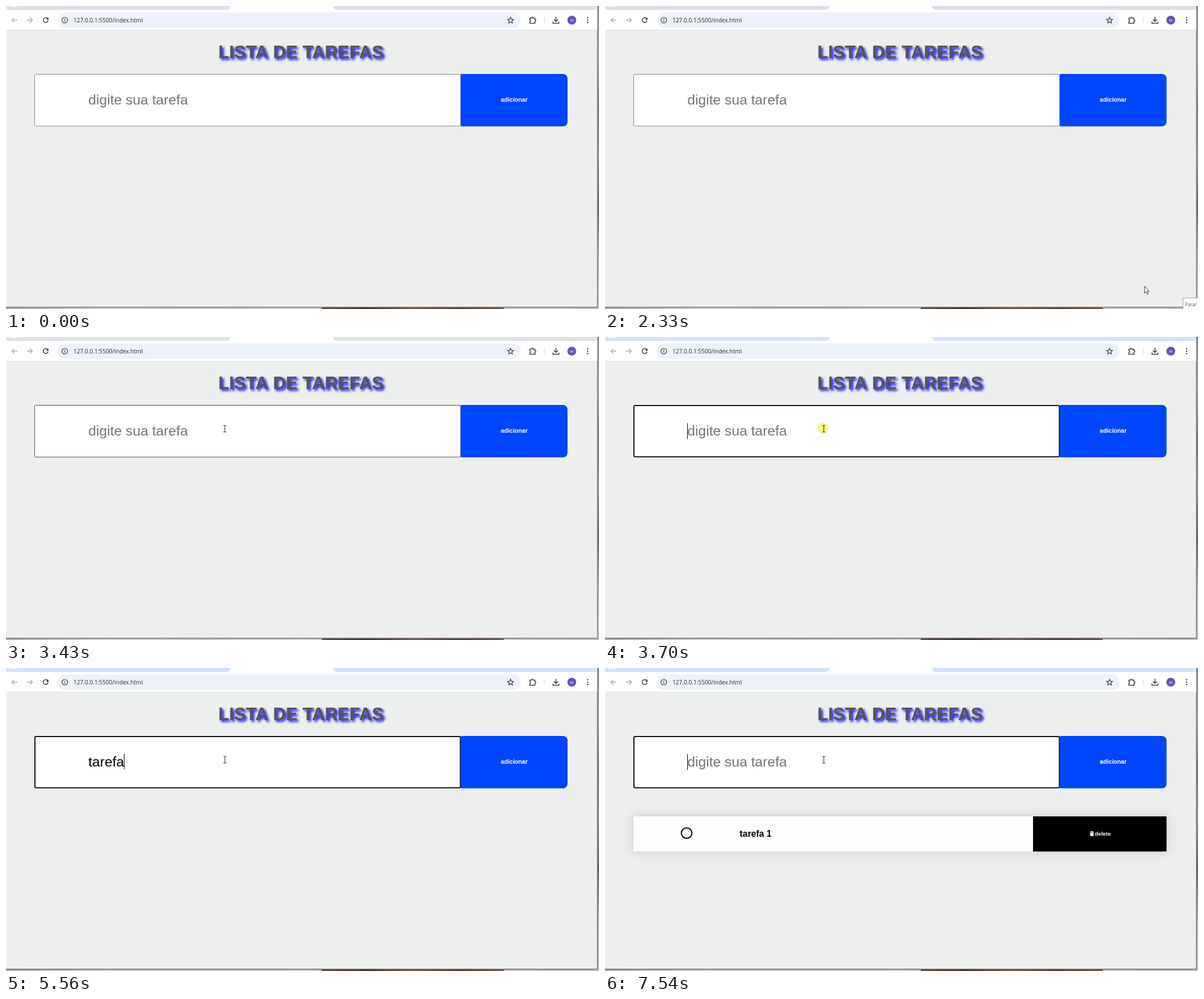
Animation of 1046 by 535 pixels, one loop 8000 ms. Source, as an HTML page with a canvas:

```html
<!DOCTYPE html>
<html lang="pt">
<head>
<meta charset="utf-8">
<title>Lista de tarefas</title>
<style>
  html, body { margin: 0; width: 100%; height: 100%; overflow: hidden; background: #edefee; }
  canvas { display: block; }
</style>
</head>
<body>
<canvas id="stage" width="1046" height="535"></canvas>
<script>
const ctx = document.getElementById('stage').getContext('2d');
const LOOP = 8000;
const ARIAL = '"Liberation Sans", Arial, sans-serif';
const UI = '"Open Sans", "Noto Sans", sans-serif';
const INK = '#3c4043';

// Each row: start time, then the values that hold from there on.
const POINTER = [
  [2330, 951, 494], [2400, 918, 482], [2470, 872, 465], [2540, 824, 447], [2610, 788, 434],
  [2880, 590, 350], [2950, 384, 260], [3230, 385, 228], [3300, 386, 190], [3370, 386, 170],
  [3430, 386, 162]
];
const TYPING = [
  [3630, '', 145], [4560, 't', 151], [4830, 'ta', 165], [5030, 'tar', 174], [5230, 'tare', 188],
  [5430, 'taref', 195], [5560, 'tarefa', 208], [6020, 'tarefa ', 215], [6480, 'tarefa 1', 229],
  [7140, '', 145]
];
const CARET = [[3630, true], [4160, false], [4560, true], [7010, false], [7540, true]];
const TOOLTIP = [[1200, 0.5], [1270, 1], [2400, 0.5], [2470, 0]];
const STRIP = [[0, '#dde1e6'], [3630, '#d8e2f1'], [3700, '#d3e3fd']];

const at = (rows, t) => rows.filter(row => row[0] <= t).pop();

function box(x, y, w, h, fill, radius = 0) {
  ctx.fillStyle = fill;
  ctx.beginPath();
  ctx.roundRect(x, y, w, h, radius);
  ctx.fill();
}

function frame(x, y, w, h, color, width, radius) {
  ctx.strokeStyle = color;
  ctx.lineWidth = width;
  ctx.beginPath();
  ctx.roundRect(x + width / 2, y + width / 2, w - width, h - width, radius);
  ctx.stroke();
}

function disc(x, y, r, fill) {
  ctx.fillStyle = fill;
  ctx.beginPath();
  ctx.arc(x, y, r, 0, Math.PI * 2);
  ctx.fill();
}

function line(d, color, width = 1.4) {
  ctx.strokeStyle = color;
  ctx.lineWidth = width;
  ctx.stroke(new Path2D(d));
}

function text(str, x, y, font, fill, align = 'left') {
  ctx.font = font;
  ctx.fillStyle = fill;
  ctx.textAlign = align;
  ctx.fillText(str, x, y);
}

function ramp(x0, y0, x1, y1, colors) {
  const g = ctx.createLinearGradient(x0, y0, x1, y1);
  colors.forEach((c, i) => g.addColorStop(i / (colors.length - 1), c));
  return g;
}

function drawDesktop(focused) {
  box(0, 531, 1046, 4, ramp(0, 0, 1046, 0, ['#a9aaaa', '#cfcfcf', '#c4c4c4', '#d0d0cf', '#b5b5b3', '#c8c8c6', '#bdbdbb']));
  box(557, 531, 321, 4, ramp(557, 0, 878, 0, ['#6b4a38', '#4a3025', '#7d5a45', '#5a3c2e', '#79573f']));
  box(1043, 0, 3, 535, ramp(0, 0, 0, 535, ['#8c8e8e', '#a5a7a7', '#777979', '#8f9191', '#606262', '#b4b5b5', '#c3c3c2']));
  box(0, 531, 1044, 1.6, focused ? '#6a6c6c' : '#7b7d7d');
  box(1042.6, 0, 1.4, 532, focused ? '#6a6c6c' : '#7b7d7d');
}

function drawToolbar(strip) {
  box(0, 0, 1043, 43, '#fff');
  box(0, 0, 396, 7, strip, [0, 0, 7, 4]);
  box(577, 0, 466, 7, strip, [0, 0, 4, 7]);
  ctx.fillStyle = '#f3f6fb';
  ctx.beginPath();
  ctx.ellipse(13, 0, 8, 2, 0, 0, Math.PI * 2);
  ctx.fill();
  box(0, 42, 1043, 1, '#dfe2e3');
  box(91, 11.5, 817, 27, '#ecf1fa', 13.5);

  line('M20 25H10.5M14.7 20.7L10.4 25L14.7 29.3', '#a6a9ad', 1.3);
  line('M37 25H46.5M42.3 20.7L46.6 25L42.3 29.3', '#a6a9ad', 1.3);
  line('M73.6 22.4A4.3 4.3 0 1 0 74.2 26', INK, 1.5);
  ctx.fillStyle = INK;
  ctx.fill(new Path2D('M75 20V24.4H70.6Z'));

  line('M108.7 25A5 5 0 1 1 98.7 25A5 5 0 1 1 108.7 25', INK, 1.2);
  box(103.1, 24.3, 1.2, 3.4, INK);
  box(103.1, 22, 1.2, 1.3, INK);
  text('127.0.0.1:5500/index.html', 119, 28.6, '10.1px ' + UI, '#2b2e31');

  ctx.beginPath();
  for (let i = 0; i < 10; i++) {
    const a = -Math.PI / 2 + i * Math.PI / 5, r = i % 2 ? 2.5 : 5.6;
    ctx.lineTo(890 + r * Math.cos(a), 25.4 + r * Math.sin(a));
  }
  ctx.closePath();
  ctx.strokeStyle = INK;
  ctx.lineWidth = 1.2;
  ctx.stroke();

  line('M924 21.4H926.7A1.6 1.6 0 0 1 930 21.4H933V24.2A1.6 1.6 0 0 1 933 27.4V30.4H924V27.6A1.8 1.8 0 0 0 924 24.2Z', INK, 1.5);
  box(949, 19.5, 1, 11, '#cddaf0');
  line('M970 19V27M966.4 23.7L970 27.3L973.6 23.7M964.8 27.4V30.5H975.2V27.4', INK, 1.5);
  disc(998, 25, 7.8, '#6a4fbe');
  text('H', 998, 27.9, '8px ' + UI, '#fff', 'center');
  for (const y of [20.7, 25, 29.3]) disc(1026, y, 1.2, INK);
}

function drawTitle() {
  ctx.save();
  ctx.shadowColor = 'blue';
  ctx.shadowBlur = 4;
  ctx.shadowOffsetX = 3;
  ctx.shadowOffsetY = 3;
  text('LISTA DE TAREFAS', 520.3, 92, 'bold 31.2px ' + ARIAL, '#555', 'center');
  ctx.restore();
}

function drawForm(t) {
  box(50, 120, 752.5, 92.5, '#fff', 2);
  if (t >= 3630) frame(50, 120, 752.5, 92.5, '#101010', 2, 2);
  else frame(50, 120, 752.5, 92.5, t >= 3300 ? '#4a4a4a' : '#808080', 1, 2);
  box(802, 120, 188.5, 92.5, '#0045ff', [2, 8, 8, 2]);
  text('adicionar', 896.5, 169.4, 'bold 10.67px ' + ARIAL, '#fff', 'center');

  const [, value, caretX] = at(TYPING, t) || [0, '', 145];
  text(value || 'digite sua tarefa', 145.2, 174, '24.7px ' + ARIAL, value ? '#000' : '#757575');
  const caret = at(CARET, t);
  if (caret && caret[1]) box(caretX, value ? 151 : 152, 1, 28, '#000');
}

function drawTask() {
  ctx.save();
  ctx.shadowColor = 'rgba(0,0,0,0.16)';
  ctx.shadowBlur = 16;
  box(50, 262, 940.5, 62, '#fdfdfd');
  ctx.restore();
  line('M153.3 291.5A9.3 9.3 0 1 1 134.7 291.5A9.3 9.3 0 1 1 153.3 291.5', '#000', 2);
  text('tarefa 1', 237.6, 297.6, 'bold 15.8px ' + ARIAL, '#000');
  box(755, 262, 235.5, 62, '#000');
  box(855.2, 289, 7, 1.2, '#fff');
  box(857.3, 288.2, 2.8, 1, '#fff');
  box(855.8, 290.7, 5.8, 6, '#fff', [0, 0, 1, 1]);
  text('delete', 864, 296.2, 'bold 9.75px ' + ARIAL, '#fff');
}

function drawTooltip(alpha) {
  ctx.save();
  ctx.globalAlpha = alpha;
  box(1019, 515, 27, 20, '#fff');
  box(1019, 515, 27, 1, '#a0a0a0');
  box(1019, 515, 1, 20, '#a0a0a0');
  text('Parar', 1023, 529.6, '8.4px ' + UI, '#575757');
  ctx.restore();
}

function drawPointer(x, y) {
  ctx.save();
  ctx.translate(x, y);
  if (y > 212) {
    const arrow = 'M.6 .8V12.9L3.4 10.3L5.4 14.8L7.3 14L5.4 9.6H9Z';
    ctx.fillStyle = '#fff';
    ctx.fill(new Path2D(arrow));
    line(arrow, '#222', 0.9);
  } else {
    line('M-2.6 -5.8H-.6L0 -5.2L.6 -5.8H2.6M0 -5.5V5.5M-2.6 5.8H-.6L0 5.2L.6 5.8H2.6', '#333', 1.1);
  }
  ctx.restore();
}

function draw(t) {
  box(0, 0, 1046, 535, '#edefee');
  drawDesktop(t >= 3630);
  drawToolbar(at(STRIP, t)[1]);
  drawTitle();
  drawForm(t);
  if (t >= 7140) drawTask();
  const tip = at(TOOLTIP, t);
  if (tip && tip[1]) drawTooltip(tip[1]);
  if (t >= 3630 && t < 3760) disc(384.3, 161, 9.5, '#fcf783');
  const p = at(POINTER, t);
  if (p) drawPointer(p[1], p[2]);
}

const start = performance.now();
function tick() {
  draw((performance.now() - start) % LOOP);
  requestAnimationFrame(tick);
}
tick();
</script>
</body>
</html>
```
